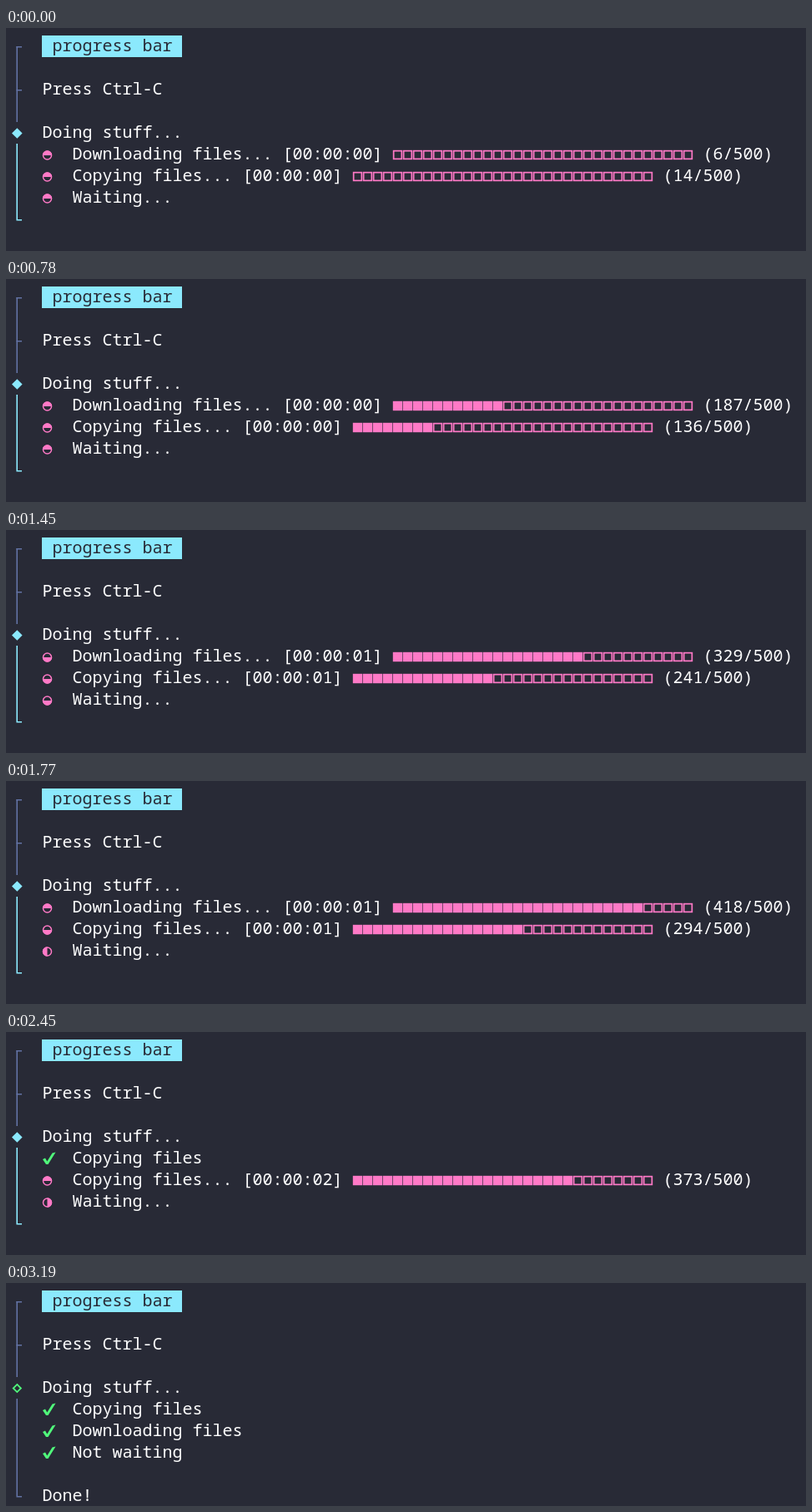
An HTML page with a canvas that plays this animation: 959x268 px, repeating every 3.59 s.

```html
<!DOCTYPE html>
<html lang="en">
<head>
<meta charset="utf-8">
<title>Progress bars</title>
<style>
  html, body { margin: 0; width: 100%; height: 100%; overflow: hidden; background: #282a36; }
  canvas { display: block; }
</style>
</head>
<body>
<canvas id="stage" width="959" height="268"></canvas>
<script>
const ctx = document.getElementById('stage').getContext('2d');

const LOOP = 3590, CELL = 12, ROW = 26, LEFT = 7, TOP = 9;
const BG = '#282a36', FG = '#ffffff', DIM = '#6272a4';
const CYAN = '#8be9fd', PINK = '#ff79c6', GREEN = '#50fa7b';
const TICK = 65, DOWNLOAD_DONE = 2110, ALL_DONE = 3190;

// [time, count] key points
const download = [[0, 6], [390, 110], [1235, 277], [1755, 418]];
const copy = [[0, 14], [390, 74], [1235, 210], [1755, 294], [2110, 336], [2795, 423]];

const colX = c => LEFT + c * CELL;
const rowY = r => TOP + r * ROW;
const midY = r => rowY(r) + ROW / 2;

// Linear between key points, carrying on past the last one
function countAt(keys, t) {
  let i = 1;
  while (i < keys.length - 1 && t >= keys[i][0]) i++;
  const [t0, v0] = keys[i - 1], [t1, v1] = keys[i];
  return Math.floor(v0 + (v1 - v0) * (t - t0) / (t1 - t0) + 1e-6);
}

// Repaints skip every third tick; finishing a task repaints at once
function paintTime(t) {
  const tick = Math.floor(t / TICK);
  const regular = (tick % 3 === 2 ? tick - 1 : tick) * TICK;
  return Math.max(regular, ...[DOWNLOAD_DONE, ALL_DONE].filter(e => e <= t));
}

function text(str, col, row, color = FG) {
  ctx.fillStyle = color;
  ctx.fillText(str, colX(col) + 0.5, rowY(row) + 19);
}

function rail(from, to, color) {
  ctx.fillStyle = color;
  ctx.fillRect(12.4, from, 1.6, to - from);
}

function branch(row, color) {
  ctx.fillStyle = color;
  ctx.fillRect(12.4, midY(row), 6.6, 1.5);
}

function polygon(points) {
  ctx.beginPath();
  points.forEach(([x, y]) => ctx.lineTo(x, y));
  ctx.closePath();
}

function diamond(row, r) {
  const x = 13.3, y = midY(row) + 0.5;
  polygon([[x, y - r], [x + r, y], [x, y + r], [x - r, y]]);
}

// The filled half turns by a quarter per step, starting at the top
function spinner(row, step) {
  const x = 49.5, y = midY(row) + 1, start = (step + 2) % 4 * Math.PI / 2;
  ctx.strokeStyle = ctx.fillStyle = PINK;
  ctx.lineWidth = 1.5;
  ctx.beginPath();
  ctx.arc(x, y, 5, 0, Math.PI * 2);
  ctx.stroke();
  ctx.beginPath();
  ctx.arc(x, y, 5.7, start, start + Math.PI);
  ctx.fill();
}

function check(row, label) {
  const y = midY(row);
  ctx.fillStyle = GREEN;
  polygon([[44, y + 1], [47, y - 0.5], [49.3, y + 3.5], [55.5, y - 6.5],
    [59.5, y - 7.5], [50.5, y + 7], [48, y + 7]]);
  ctx.fill();
  text(label, 6, row);
}

function progress(row, label, count, secs) {
  const head = `${label}... [00:00:0${secs}] `;
  const bar = 6 + head.length;
  const full = Math.floor(count * 30 / 500);
  text(head, 6, row);
  ctx.fillStyle = ctx.strokeStyle = PINK;
  ctx.lineWidth = 1.7;
  for (let i = 0; i < 30; i++) {
    const x = colX(bar + i) + 0.8, y = midY(row) - 5.2;
    if (i < full) ctx.fillRect(x, y, 11.4, 11.4);
    else ctx.strokeRect(x + 0.85, y + 0.85, 9.7, 9.7);
  }
  text(`(${count}/500)`, bar + 31, row);
}

function draw(t) {
  const done = t >= ALL_DONE;
  const tick = Math.floor(t / TICK);
  const secs = Math.floor((t + 60) / 1000);
  ctx.fillStyle = BG;
  ctx.fillRect(0, 0, 959, 268);
  ctx.font = '500 20px "Noto Sans Mono", "DejaVu Sans Mono", monospace';

  rail(midY(0), rowY(4), DIM);
  branch(0, DIM);
  branch(2, DIM);
  ctx.fillStyle = CYAN;
  ctx.fillRect(colX(3), rowY(0), 14 * CELL, ROW);
  text('progress bar', 4, 0, BG);
  text('Press Ctrl-C', 3, 2);
  text('Doing stuff...', 3, 4);

  const last = done ? 9 : 8, railColor = done ? DIM : CYAN;
  rail(rowY(5), midY(last), railColor);
  branch(last, railColor);

  if (done) {
    diamond(4, 4.6);
    ctx.strokeStyle = GREEN;
    ctx.lineWidth = 1.8;
    ctx.stroke();
    check(5, 'Copying files');
    check(6, 'Downloading files');
    check(7, 'Not waiting');
    text('Done!', 3, 9);
    return;
  }

  diamond(4, 6.3);
  ctx.fillStyle = CYAN;
  ctx.fill();
  if (t >= DOWNLOAD_DONE) {
    check(5, 'Copying files');
  } else {
    spinner(5, 2 * Math.ceil(tick / 2));
    progress(5, 'Downloading files', countAt(download, t), secs);
  }
  spinner(6, 2 * Math.floor(tick / 2));
  progress(6, 'Copying files', countAt(copy, t), secs);
  spinner(7, tick);
  text('Waiting...', 6, 7);
}

const start = performance.now();
function frame() {
  draw(paintTime((performance.now() - start) % LOOP));
  requestAnimationFrame(frame);
}
frame();
</script>
</body>
</html>
```
